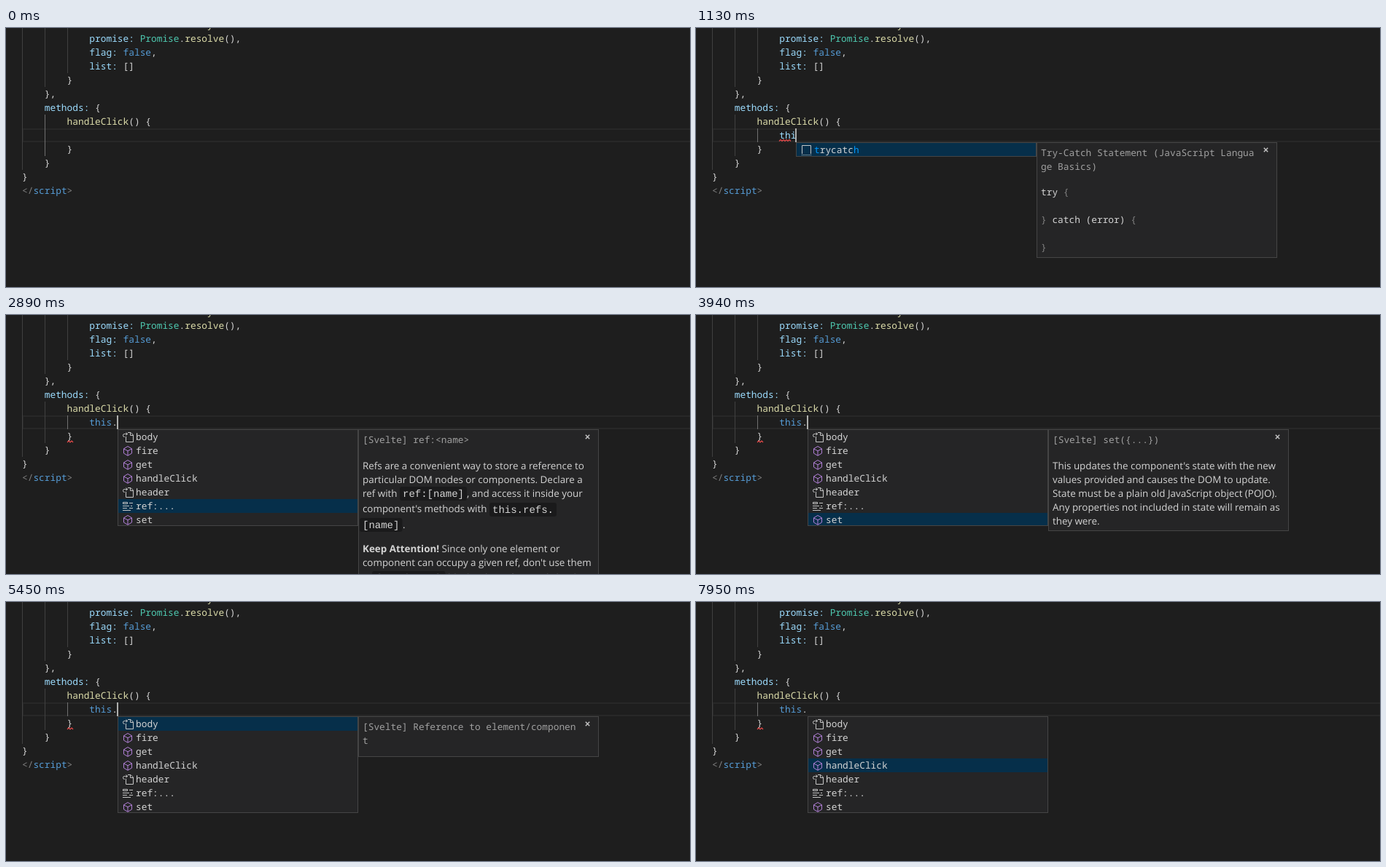
An HTML page for the animation above (8 s loop, 938x356 px).

```html
<!DOCTYPE html>
<html lang="en">
<head>
<meta charset="utf-8">
<title>Editor completion</title>
<style>
html, body { margin: 0; width: 100%; height: 100%; overflow: hidden; background: #1e1e1e; }
svg { display: block; }
text { white-space: pre; fill: #d4d4d4; text-rendering: geometricPrecision; }
.mono { font: 12.83px "Noto Sans Mono", monospace; }
#code .mono, #line .mono { font-weight: 500; }
.doc { font: 13.4px "Open Sans", sans-serif; }
.doc .b { font-weight: 700; }
.chip { font: 14px "Liberation Mono", monospace; }
</style>
</head>
<body>
<svg id="stage" width="938" height="356" viewBox="0 0 938 356">
  <g id="code"></g>
  <g id="line"></g>
  <g id="popup"></g>
  <rect id="caret" y="138" width="2" height="19" fill="#aeafad"/>
</svg>
<script>
const LOOP = 8000, CHAR = 7.697, LEFT = 22, ROW = 19, TOP = 5;
const C = {
  text: '#d4d4d4', prop: '#9cdcfe', type: '#4ec9b0', func: '#dcdcaa', key: '#569cd6',
  dim: '#808080', label: '#a0a0a0', match: '#0097fb', error: '#f14c4c', icon: '#c5c5c5',
  guide: '#404040', active: '#707070', panel: '#252526', border: '#454545', select: '#062f4a',
  current: '#282828'
};
const $ = id => document.getElementById(id);
const esc = s => s.replace(/&/g, '&amp;').replace(/</g, '&lt;');
const rect = (x, y, w, h, fill, r = 0) =>
  `<rect x="${x}" y="${y}" width="${w}" height="${h}" rx="${r}" fill="${fill}"/>`;
const path = (d, color, w = 1, more = '') =>
  `<path d="${d}" fill="none" stroke="${color}" stroke-width="${w}" ${more}/>`;
const text = (x, y, s, color = C.text, cls = 'mono') =>
  `<text x="${x}" y="${y}" class="${cls}" style="fill:${color}">${esc(s)}</text>`;
// runs: [string, color] pairs set on one line
const runs = (x, y, list) => `<text x="${x}" y="${y}" class="mono">` +
  list.map(([s, c]) => `<tspan style="fill:${C[c || 'text']}">${esc(s)}</tspan>`).join('') + '</text>';
const colX = col => LEFT + col * CHAR;
const baseline = row => TOP + row * ROW + 14;
const guide = (x, y1, y2, color = C.guide) => rect(x, y1, 1, y2 - y1, color);

function squiggle(x, y, w) {
  let d = `M${x} ${y + 2.5}`;
  for (let i = 2; i <= w; i += 2) d += `L${x + i} ${y + (i % 4 ? 0.5 : 2.5)}`;
  return path(d, C.error, 1.1);
}

function drawCode() {
  const lines = [
    [12, ['promise:', 'prop'], [' '], ['Promise', 'type'], ['.'], ['resolve', 'func'], ['(),']],
    [12, ['flag:', 'prop'], [' '], ['false', 'key'], [',']],
    [12, ['list:', 'prop'], [' []']],
    [8, ['}']],
    [4, ['},']],
    [4, ['methods:', 'prop'], [' {']],
    [8, ['handleClick', 'func'], ['() {']],
    [0],
    [8, ['}']],
    [4, ['}']],
    [0, ['}']],
    [0, ['</', 'dim'], ['script', 'key'], ['>', 'dim']]
  ];
  $('code').innerHTML =
    `<rect x="23" y="139" width="930" height="17" fill="none" stroke="${C.current}" stroke-width="2"/>` +
    guide(22, 0, 195) + guide(53, 0, 81) + guide(84, 0, 62) +
    text(colX(33), 0, 'y', C.func) +
    lines.map(([col, ...list], i) => runs(colX(col), baseline(i), list)).join('');
}

function drawLine(s) {
  const typed = s.typed, known = typed.startsWith('this') && !s.raw;
  let out = typed
    ? guide(53, 119, 176) + guide(84, 138, 157, C.active)
    : guide(53, 119, 176, C.active);
  out += runs(colX(12), baseline(7), [[typed.slice(0, 4), known ? 'key' : 'prop'], [typed.slice(4)]]);
  if (s.wave) out += squiggle(114, 153, s.wave);
  if (typed.endsWith('.')) out += squiggle(84, 172.5, 8);
  $('line').innerHTML = out;
}

// Icons on a 16 px grid
const icons = {
  cube: path('M8 1.5l5.5 3.3v6.3L8 14.3l-5.5-3.2V4.8zM2.5 5L8 7.8 13.5 5M8 7.8v6.4', '#b180d7'),
  ref: path('M5.5 7v7.5h10V5L12 1.5H8M11.5 1.5v4h4M4 7.5h-.5a2 2 0 0 1 0-4h4M5.5 1.4l2.1 2.1-2.1 2.1', C.icon),
  word: path('M1.5 2.5h6v2h-6zM10 3.5h5M1 7.5h9m2 0h2M1 10.5h6m3 0h5M1 13.5h11', C.icon),
  snippet: path('M2.5 13V1.5h12V13', C.icon) + path('M2 14.5h13', C.icon, 1, 'stroke-dasharray="1 1"')
};
const icon = (name, x, y) => `<g transform="translate(${x} ${y})">${icons[name]}</g>`;

const panel = (x, h) =>
  `<rect x="${x + .5}" y="157.5" width="329" height="${h - 1}" fill="${C.panel}" stroke="${C.border}"/>`;

function details(x, h, title) {
  const cx = x + 314.5;
  return panel(x, h) +
    path(`M${cx - 2.7} 164.8l5.4 5.4m0-5.4l-5.4 5.4`, C.icon, 1.4) +
    title.map((s, i) => text(x + 6, 176 + i * ROW, s, C.label)).join('');
}
const doc = (x, y, s) => text(x, y, s, C.text, 'doc');
const prose = (lines, y = 212) => lines.map((s, i) => doc(489, y + i * ROW, s)).join('');
const chip = (x, y, s) => rect(x, y - 14, s.length * 8.4 + 8, 19, '#1a1a1b', 3) +
  text(x + 4, y, s, C.text, 'chip');

function refDocs() {
  return prose(['Refs are a convenient way to store a reference to', 'particular DOM nodes or components. Declare a', 'ref with']) +
    chip(540, 250, 'ref:[name]') + doc(632, 250, ', and access it inside your') +
    doc(489, 271, "component's methods with") + chip(663, 272, 'this.refs.') +
    chip(485, 293, '[name]') + doc(544, 293, '.') +
    `<text x="489" y="326" class="doc"><tspan class="b">Keep Attention!</tspan> Since only one element or</text>` +
    prose(["component can occupy a given ref, don't use them"], 345) +
    doc(489, 366, 'in') + chip(502, 366, '{#each ...}') +
    doc(606, 366, 'blocks, this ref can only be the');
}

const refTitle = ['[Svelte] Reference to element/componen', 't'];
const items = [
  { name: 'body', icon: 'ref', h: 56, title: refTitle },
  { name: 'fire', icon: 'cube', h: 121, title: ['[Svelte] fire(eventName, event)'],
    docs: ['Fires an event from the component. All of the', 'listeners registered for the event name', 'will be called with the given event object as', 'their first argument.'] },
  { name: 'get', icon: 'cube', h: 83, title: ['[Svelte] get()'],
    docs: ["Returns the component's current state. This will", 'also retrieve the value of computed properties.'] },
  { name: 'handleClick', icon: 'cube' },
  { name: 'header', icon: 'ref', h: 56, title: refTitle },
  { name: 'ref:...', icon: 'word', h: 230, title: ['[Svelte] ref:<name>'], draw: refDocs },
  { name: 'set', icon: 'cube', h: 140, title: ['[Svelte] set({...})'],
    docs: ["This updates the component's state with the new", 'values provided and causes the DOM to update.', 'State must be a plain old JavaScript object (POJO).', 'Any properties not included in state will remain as', 'they were.'] }
];

function memberList(pick) {
  const it = items[pick], y = 158 + pick * ROW;
  let out = it.title ? details(483, it.h, it.title) : '';
  if (it.docs) out += prose(it.docs);
  if (it.draw) out += it.draw();
  out += panel(153, 133) + rect(154, y, 328, Math.min(ROW, 289 - y), C.select);
  items.forEach((row, i) => {
    out += icon(row.icon, 159, 160 + i * ROW) + text(178, 172 + i * ROW, row.name);
  });
  return out;
}

function snippetList() {
  return details(467, 159, ['Try-Catch Statement (JavaScript Langua', 'ge Basics)']) +
    runs(473, 230, [['try '], ['{', 'dim']]) +
    runs(473, 268, [['} ', 'dim'], ['catch (error) '], ['{', 'dim']]) +
    runs(473, 306, [['}', 'dim']]) +
    panel(137, 20) + rect(138, 158, 328, 18, C.select) + icon('snippet', 143, 160) +
    runs(162, 172, [['t', 'match'], ['rycatc'], ['h', 'match']]);
}

// Each step changes part of the state from its time on
const steps = [
  [0, { typed: '', caret: false, list: null, wave: 0, raw: false }],
  [480, { caret: true }],
  [890, { typed: 't' }],
  [1010, { typed: 'th' }],
  [1080, { wave: 16 }],
  [1130, { typed: 'thi', list: 'snippet' }],
  [1180, { list: null }],
  [1250, { typed: 'this', raw: true }],
  [1350, { raw: false, wave: 0 }],
  [1530, { typed: 'this.' }],
  [1580, { list: 4 }],
  [2010, { caret: false }],
  [2510, { caret: true }],
  [2890, { list: 5 }],
  [3020, { caret: false }],
  [3530, { caret: true }],
  [3940, { list: 6 }],
  [3990, { caret: false }],
  [4460, { caret: true }],
  [4940, { list: 0 }],
  [4990, { caret: false }],
  [5450, { caret: true }],
  [5730, { list: 1 }],
  [5960, { caret: false }],
  [6470, { caret: true, list: 2 }],
  [6980, { caret: false }],
  [7260, { list: 3 }],
  [7440, { caret: true }],
  [7950, { caret: false }]
];

let shown = -1;
function render(t) {
  const count = steps.filter(([at]) => at <= t).length;
  if (count === shown) return;
  shown = count;
  const s = Object.assign({}, ...steps.slice(0, count).map(step => step[1]));
  drawLine(s);
  $('popup').innerHTML = s.list === null ? '' : s.list === 'snippet' ? snippetList() : memberList(s.list);
  $('caret').setAttribute('x', Math.round(colX(12 + s.typed.length) - 1));
  $('caret').setAttribute('visibility', s.caret ? 'visible' : 'hidden');
}

drawCode();
render(0);
const start = performance.now();
function tick() {
  render((performance.now() - start) % LOOP);
  requestAnimationFrame(tick);
}
requestAnimationFrame(tick);
</script>
</body>
</html>
```
